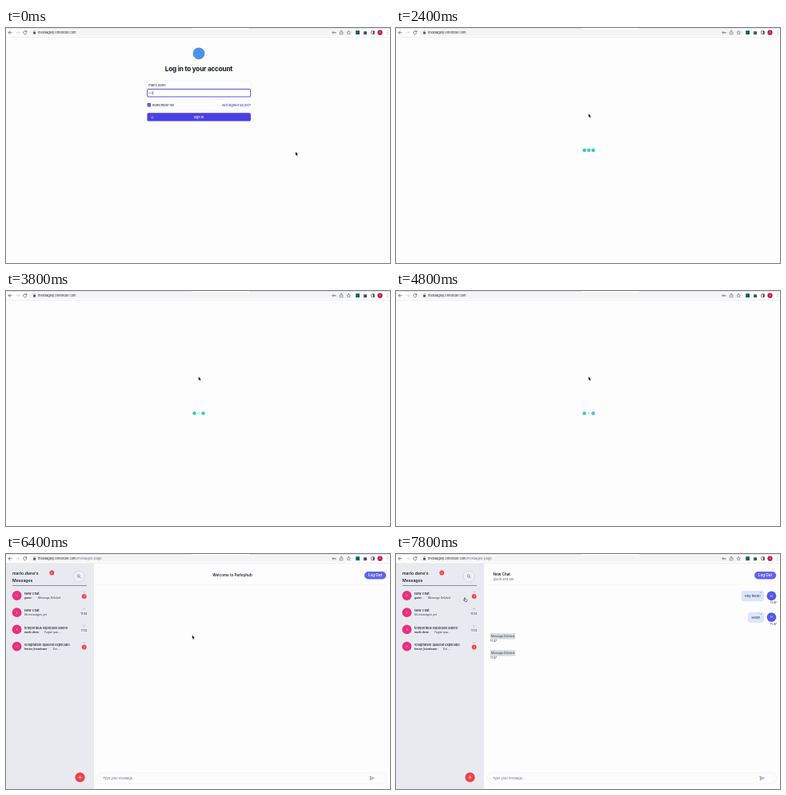
Recreate the animation shown at these times as an HTML page. Size 480 by 294 pixels, loop 8000 ms.

```html
<!DOCTYPE html>
<html lang="en">
<head>
<meta charset="utf-8">
<title>Chat sign-in</title>
<style>
  html, body { margin: 0; width: 100%; height: 100%; overflow: hidden; background: #fdfdfd; }
  svg { display: block; width: 480px; height: 294px; }
  text { font-family: Inter, Roboto, sans-serif; white-space: pre; }
</style>
</head>
<body>
<svg id="stage" viewBox="0 0 480 294" xmlns="http://www.w3.org/2000/svg"></svg>
<script>
const LOOP = 8000, FRAME = 1000 / 15;
const INDIGO = '#4a3fe3', RED = '#ef4048', PINK = '#e6307f', TEAL = '#36c9b2';
const INK = '#1b2130', GREY = '#6b7280';

// Drawing helpers: each returns SVG markup.
const text = (x, y, s, size = 4, fill = INK, more = '') =>
  `<text x="${x}" y="${y}" font-size="${size}" fill="${fill}" ${more}>${s}</text>`;
const rect = (x, y, w, h, fill, r = 0, more = '') =>
  `<rect x="${x}" y="${y}" width="${w}" height="${h}" rx="${r}" fill="${fill}" ${more}/>`;
const circle = (x, y, r, fill, more = '') =>
  `<circle cx="${x}" cy="${y}" r="${r}" fill="${fill}" ${more}/>`;
const line = (d, color = INK, w = 0.6, fill = 'none') =>
  `<path d="${d}" fill="${fill}" stroke="${color}" stroke-width="${w}" stroke-linecap="round" stroke-linejoin="round"/>`;
const group = (id, ...parts) => `<g id="${id}">${parts.join('')}</g>`;

const MID = 'text-anchor="middle"', END = 'text-anchor="end"';
const MEDIUM = 'font-weight="500"', SEMI = 'font-weight="600"', BOLD = 'font-weight="700"';
const ITALIC = 'font-style="italic"';

const chevron = (x, y) => line(`M${x - 1.4} ${y - 0.6}l1.4 1.3 1.4 -1.3`, '#6d7fc4', 0.45);
const badge = (x, y, n) => circle(x, y, 2.9, RED) + text(x, y + 1.2, n, 3.3, '#fff', MID);
const avatar = (x, y, letter, fill) =>
  circle(x, y, 5.9, fill) + text(x, y + 1.3, letter, 3.6, '#ffffffb0', MID);

const toolbar = () => group('toolbar',
  rect(0, 0, 480, 11.5, '#fff'),
  rect(0, 0, 232, 0.9, '#dcdfe4'), rect(304, 0, 176, 0.9, '#dcdfe4'),
  rect(29, 1.6, 405, 8.2, '#f3f4f5', 4.1),
  rect(0, 11.2, 480, 0.6, '#e4e5e8'),
  line('M7.2 5.7H3.2M5 3.8L3.1 5.7 5 7.6', '#45484c', 0.65),
  line('M12.8 5.7h4M15 3.8l1.9 1.9L15 7.6', '#c3c6ca', 0.6),
  line('M25.6 4.5A2.1 2.1 0 1 0 25.9 6.3M25.9 3.4v1.5h-1.5', '#45484c', 0.65),
  rect(34, 5, 3, 2.6, '#55585d', 0.3),
  line('M34.7 5V4.3a.8.8 0 0 1 1.6 0V5', '#55585d', 0.5),
  text(40, 7.2, 'messagely.onrender.com<tspan id="path" fill="#70757a">/messages-page</tspan>', 4, '#26282c'),
  circle(408.8, 5.7, 0.9, 'none', 'stroke="#55585d" stroke-width=".7"'),
  line('M409.8 5.7h2.3v.8', '#55585d', 0.7),
  line('M418 5h-.8v2.9h3.8V5h-.8M419.1 6.4V3.1M418 4.1l1.1-1.1 1.1 1.1', '#55585d', 0.5),
  line('M428.3 3.4l.7 1.6 1.7.1-1.3 1.1.4 1.7-1.5-.9-1.5.9.4-1.7-1.3-1.1 1.7-.1z', '#55585d', 0.45),
  rect(437.2, 3.2, 4.8, 4.9, '#12606b'),
  line('M447.4 4.5h1a.7.7 0 0 1 1.3 0h1v1a.7.7 0 0 1 0 1.3v1.1h-3.3z', '#45484c', 0.4, '#45484c'),
  rect(456.5, 3.7, 3.9, 4, 'none', 0.4, 'stroke="#45484c" stroke-width=".6"'),
  rect(458.7, 3.7, 1.7, 4, '#45484c'),
  circle(467.5, 5.7, 3.1, '#c5124f'), text(467.5, 6.8, 'A', 3, '#fff', MID),
  [3.8, 5.7, 7.6].map(y => circle(477, y, 0.45, '#45484c')).join(''));

const login = () => group('login',
  circle(241, 31.8, 7.4, '#4b93e4'),
  text(241, 54.4, 'Log in to your account', 8.2, '#111827', `${MID} ${BOLD} letter-spacing="-.2"`),
  rect(176.5, 66.2, 129.3, 10, '#fff', 1.2, 'stroke="#e3e5ea" stroke-width=".4"'),
  text(178.2, 72.5, 'marlo.dene'),
  rect(176.7, 76.5, 128.9, 9.5, '#fff', 0.8, `stroke="${INDIGO}" stroke-width=".9"`),
  [179, 180.8, 182.6].map(x => circle(x, 81.3, 0.55, '#41464f')).join(''),
  rect(183.6, 78.6, 0.5, 5.2, '#222', 0, 'id="caret"'),
  rect(176.6, 94.1, 4.5, 4.5, INDIGO, 0.8),
  line('M177.8 96.4l.8.8 1.5-1.7', '#fff', 0.5),
  text(183, 97.8, 'Remember me'),
  text(306, 97.8, 'Not signed up yet?', 4, INDIGO, `${END} ${MEDIUM}`),
  rect(176.5, 106.2, 129.4, 10.4, INDIGO, 1.5, 'id="button"'),
  rect(181.2, 110.9, 3.4, 2.6, '#7f7cf3', 0.4),
  line('M181.9 110.9v-.7a1 1 0 0 1 2 0v.7', '#7f7cf3', 0.5),
  text(241, 112.8, 'Sign in', 4, '#fff', `${MID} ${MEDIUM}`));

const loader = () => group('loader',
  [-1, 0, 1].map(i => `<circle class="dot" cx="${241 + i * 5.5}" cy="153" fill="${TEAL}"/>`).join(''));

const chats = [
  { y: 52, letter: 'U', title: 'New Chat', who: 'guest :', note: 'Message Deleted', dx: 40, slant: true, count: 3 },
  { y: 73.2, letter: 'E', title: 'New Chat', who: '', note: 'No messages yet', dx: 23, slant: true, time: '11:34' },
  { y: 94.4, letter: 'S', title: 'temporibus explicabo labore', who: 'marlo.dene :', note: 'Fugiat qua...', dx: 48, time: '11:12' },
  { y: 115.6, letter: 'H', title: 'voluptatem quaerat explicabo', who: 'hector_brandower :', note: 'Est ...', dx: 59, count: 2 },
];
const chatRow = c =>
  avatar(13.6, c.y, c.letter, PINK) +
  text(23, c.y - 0.8, c.title, 4, INK, MEDIUM) +
  text(23, c.y + 4.1, c.who, 3.2, INK, SEMI) +
  text(c.dx, c.y + 4.1, c.note, 3.4, '#30353f', c.slant ? ITALIC : '') +
  chevron(97.7, c.y - 4.5) +
  (c.time ? text(101.3, c.y + 2.6, c.time, 3.43, INK, END) : badge(97.7, c.y + 0.9, c.count));

const inbox = () => group('inbox',
  rect(0, 11.8, 110, 283, '#e9eaef'),
  text(8, 26.3, "marlo.dene's", 5.14, INK, SEMI),
  text(8, 34.5, 'Messages', 5.14, INK, SEMI),
  badge(57.3, 23.5, 5),
  circle(91.2, 28, 7, '#eff0f4', 'stroke="#c3c7d0" stroke-width=".5"'),
  circle(90.7, 27.4, 1.6, 'none', 'stroke="#3a404c" stroke-width=".5"'),
  line('M91.9 28.6l1.5 1.5', '#3a404c', 0.5),
  rect(8, 39, 93, 0.6, '#4b5160'),
  chats.map(chatRow).join(''),
  circle(92.5, 279.4, 6.1, RED),
  line('M90.5 279.4h4M92.5 277.4v4', '#fff', 0.6),
  rect(115, 38.6, 361, 0.4, '#eceef1'),
  rect(448, 22, 27.2, 9.4, '#6163ee', 4.7),
  text(461.6, 28.2, 'Log Out', 4.5, '#fff', `${MID} ${SEMI}`),
  rect(114.5, 273.8, 361, 13.4, '#fdfdfd', 6.7, 'stroke="#e8eaee" stroke-width=".5"'),
  text(121, 282, 'Type your message...', 4, GREY),
  line('M455 278.3l5.3 2.2-5.3 2.2.7-2.2zM455.7 280.5h2', '#5b5fd0', 0.55));

const welcome = () => group('welcome',
  text(283, 28.2, 'Welcome to Parleyhub', 4.57, INK, `${MID} ${SEMI}`));

const chatHead = () => group('chatHead',
  text(121.5, 27.2, 'New Chat', 4.57, INK, SEMI),
  text(121.5, 32.8, 'guest and Me', 4, GREY));

const sent = (x, y, s) =>
  rect(x, y, 460 - x, 13.2, '#dbe6fd', 3) +
  text((x + 460) / 2, y + 7.8, s, 4, INK, MID) +
  chevron(456, y + 2.2) +
  avatar(469.4, y + 6.3, 'M', '#5558e8') +
  text(475.8, y + 16.2, '11:47', 3.43, INK, END);
const deleted = y =>
  rect(117.8, y, 31.4, 7.4, '#d5d7dc', 0.6) +
  text(119, y + 4.8, 'Message Deleted', 3.5, '#3d434e') +
  text(118, y + 10.6, '11:47', 3.43);
const messages = () => group('messages',
  sent(431.7, 46, 'Hey there!'), sent(440, 72.8, 'Hello!'),
  deleted(99.2), deleted(120.2));

const pointer = () => group('pointer',
  group('arrow', line('M0 0v4.3l1-.9.7 1.7.7-.3-.7-1.6h1.4z', '#fff', 0.5, '#111')
    .replace('<path', '<path paint-order="stroke"')),
  group('hand', line('M-.4 0Q0-.5.4 0V1.8l2 .5q.6.2.5.9L2.4 5H.2L-1.3 3.2q-.3-.7.3-.7l.6.5z', '#111', 0.5, '#fff')));

const stage = document.getElementById('stage');
stage.innerHTML = [login, loader, inbox, welcome, chatHead, messages, toolbar, pointer].map(f => f()).join('');
const el = id => document.getElementById(id);
const show = (id, on) => el(id).setAttribute('visibility', on ? 'inherit' : 'hidden');
const dots = [...stage.querySelectorAll('.dot')];

// Pointer track: time, x, y
const track = [
  [1333, 362, 155], [1400, 338, 143], [1467, 272, 108], [1533, 232.6, 88.7],
  [1667, 233, 91], [1800, 237, 100], [2000, 240.7, 107.3], [6133, 240.7, 107.3],
  [6267, 238, 106], [6400, 232.8, 101.8], [6600, 184, 86], [6800, 125, 68],
  [7000, 92, 57], [7200, 86, 54.6],
];
function pointerAt(t) {
  const i = track.findIndex(p => p[0] > t);
  if (i < 0) return track[track.length - 1].slice(1);
  if (i === 0) return track[0].slice(1);
  const [a, b] = [track[i - 1], track[i]];
  const k = (t - a[0]) / (b[0] - a[0]);
  return [1, 2].map(n => a[n] + (b[n] - a[n]) * k);
}

// One-second beat; the outer dots follow half a beat later.
function beat(t, delay) {
  const age = t - 2340 - delay;
  if (age < 0) return 0;
  return 1 - Math.abs((age % 1000) / 500 - 1);
}

function draw(now) {
  const t = Math.floor((now % LOOP + 4) / FRAME) * FRAME;
  const since = ms => t >= ms - 10;
  const home = since(5930), opened = since(7600);

  show('login', !since(2270));
  show('loader', since(2270) && !home);
  show('inbox', home);
  show('path', home);
  show('welcome', home && !opened);
  show('chatHead', opened);
  show('messages', since(7670));
  show('caret', !since(2270) && (!since(400) || (since(870) && !since(1400)) || since(1930)));

  dots.forEach((dot, i) => {
    const dip = beat(t, i === 1 ? 0 : 500);
    dot.setAttribute('r', 2.35 * (1 - 0.25 * dip));
    dot.setAttribute('opacity', 1 - 0.8 * dip);
  });

  const [x, y] = pointerAt(t);
  const onButton = !since(2270) && y > 106.2 && x < 306 && since(1533);
  const onRow = home && x < 105 && y < 125;
  el('pointer').setAttribute('transform', `translate(${x} ${y})`);
  show('hand', onButton || onRow);
  show('arrow', !(onButton || onRow));
  el('button').setAttribute('fill', onButton ? '#4338ca' : INDIGO);
}

const start = performance.now();
function tick() {
  draw(performance.now() - start);
  requestAnimationFrame(tick);
}
tick();
</script>
</body>
</html>
```
